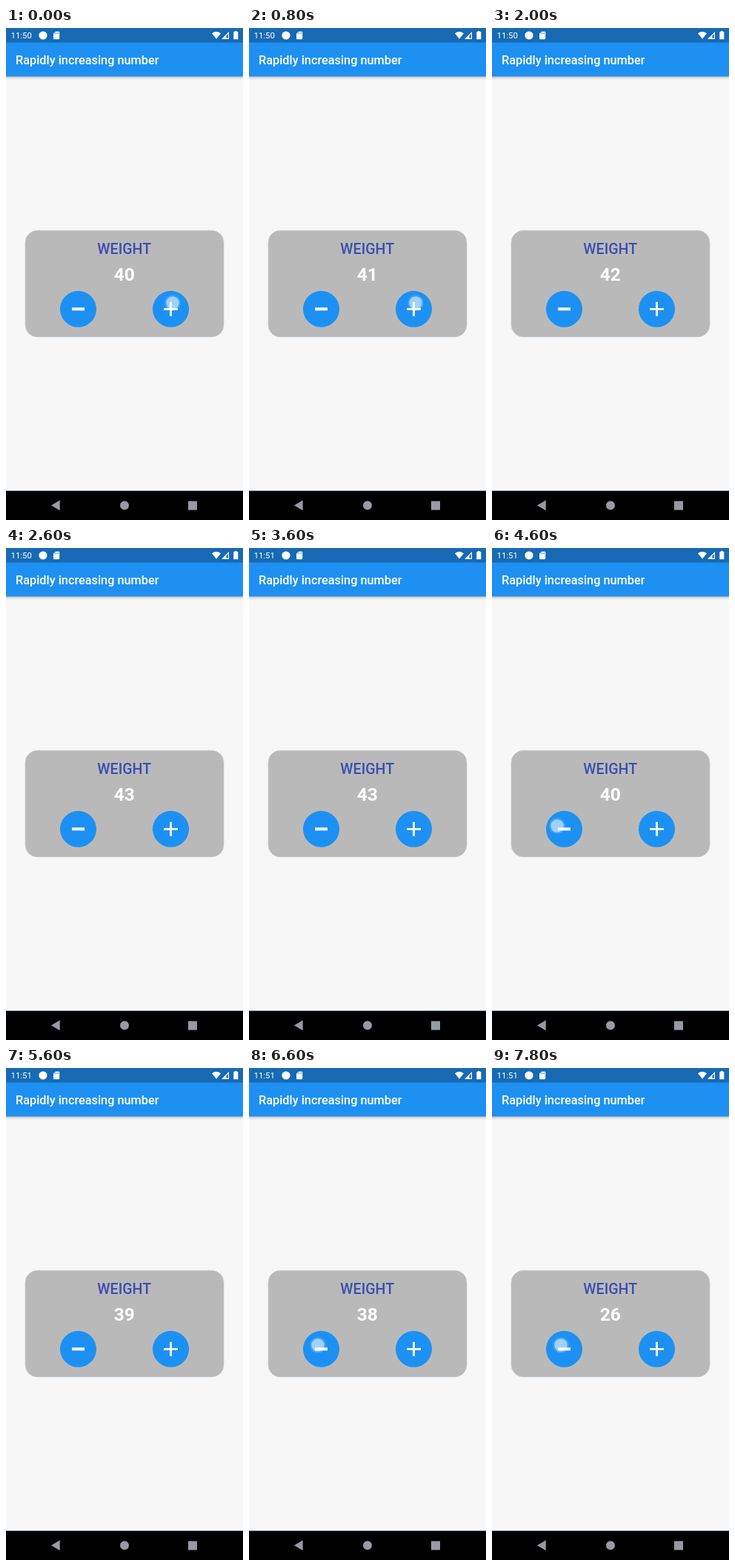
These frames come from a looping animation (320 px wide and 664 px high, 8 s). An HTML page:

```html
<!DOCTYPE html>
<html lang="en">
<head>
<meta charset="utf-8">
<title>Rapidly increasing number</title>
<style>
html, body { margin: 0; width: 100%; height: 100%; overflow: hidden; background: #f7f7f7; }
svg { display: block; width: 100vw; height: 100vh; }
text { font-family: Roboto, sans-serif; fill: #fff; }
</style>
</head>
<body>
<svg viewBox="0 0 320 664">
  <defs>
    <linearGradient id="shade" x2="0" y2="1">
      <stop offset="0" stop-color="#000" stop-opacity=".28"/>
      <stop offset=".5" stop-color="#000" stop-opacity=".06"/>
      <stop offset="1" stop-color="#000" stop-opacity="0"/>
    </linearGradient>
  </defs>
  <rect width="320" height="664" fill="#f7f7f7"/>

  <rect y="65" width="320" height="6" fill="url(#shade)"/>
  <rect y="19" width="320" height="46.3" fill="#1e90f2"/>
  <rect width="320" height="19.6" fill="#176ab3"/>
  <text id="clock" x="6.5" y="14" font-size="11.4"></text>
  <g fill="#fff">
    <circle cx="50" cy="10" r="5.6"/>
    <path d="M67 4.7h4.2q1 0 1 1v8.6q0 1-1 1h-6.2q-1 0-1-1v-6.6z"/>
    <path d="M278 7.3q6-4.6 12 0l-6 7.5z"/>
    <path fill-rule="evenodd" d="M301 5v10h-10zM299.8 8v5.8h-2.3v-3.5z"/>
    <path d="M309 4h2.6v1.1h1.7v10.1h-6V5.1h1.7z"/>
  </g>
  <path d="M66.5 6v2M68.5 6v2M70.5 6v2" stroke="#176ab3" stroke-width=".7"/>
  <text x="13" y="49" font-size="16.3" font-weight="500">Rapidly increasing number</text>

  <rect x="26" y="273.3" width="268" height="143.6" rx="16.3" fill="#bab9b9" stroke="#b9c9d8" stroke-width=".6"/>
  <text x="159.700" y="304.9" font-size="19.6" font-weight="500" text-anchor="middle" style="fill:#3a4db3">WEIGHT</text>
  <text id="count" x="159.8" y="340.5" font-size="24.5" font-weight="700" text-anchor="middle"></text>
  <g fill="#1c91f3">
    <circle cx="97.5" cy="379.3" r="24.5"/>
    <circle cx="222.5" cy="379.3" r="24.5"/>
  </g>
  <path d="M89 379.3h17" stroke="#fff" stroke-width="4"/>
  <path d="M213 379.3h19M222.5 369.8v19" stroke="#fff" stroke-width="2.8"/>
  <g id="touch" fill="#fff">
    <circle r="10.8" opacity=".16"/>
    <circle r="8.7" opacity=".5"/>
  </g>

  <rect y="624" width="320" height="1" fill="#7f9dbb"/>
  <rect y="625" width="320" height="39"/>
  <g fill="#969aa5">
    <path d="M61 644.3l11.7-7v14z"/>
    <circle cx="160" cy="644.3" r="6"/>
    <rect x="246" y="638.5" width="12" height="12"/>
  </g>
</svg>
<script>
const LOOP = 8000, STEP = 200;
const REPEAT_FROM = 6500, REPEAT = 100;
const el = id => document.getElementById(id);
const clock = el('clock'), count = el('count'), touch = el('touch');

// [time, value]
const values = [[0, 40], [200, 41], [1200, 42], [2400, 43],
  [4000, 42], [4200, 41], [4400, 40], [4800, 39]];

// [start, end, x, y]
const presses = [
  [0, 200, 225, 371], [800, 1200, 225, 371], [2200, 2400, 225, 371],
  [3800, 4000, 88, 375], [4200, 4400, 88, 375], [4600, 4800, 88, 375],
  [6000, LOOP, 93, 374]
];

function valueAt(t) {
  const base = values.filter(v => v[0] <= t).pop()[1];
  return base - Math.max(0, Math.floor((t - REPEAT_FROM) / REPEAT));
}

function draw(t) {
  t = Math.floor(t / STEP) * STEP;
  clock.textContent = t < 3600 ? '11:50' : '11:51';
  count.textContent = valueAt(t);
  const press = presses.find(p => t >= p[0] && t < p[1]);
  touch.setAttribute('visibility', press ? 'visible' : 'hidden');
  if (press) touch.setAttribute('transform', `translate(${press[2]} ${press[3]})`);
}

const start = performance.now();
function tick() {
  draw((performance.now() - start) % LOOP);
  requestAnimationFrame(tick);
}
tick();
</script>
</body>
</html>
```
